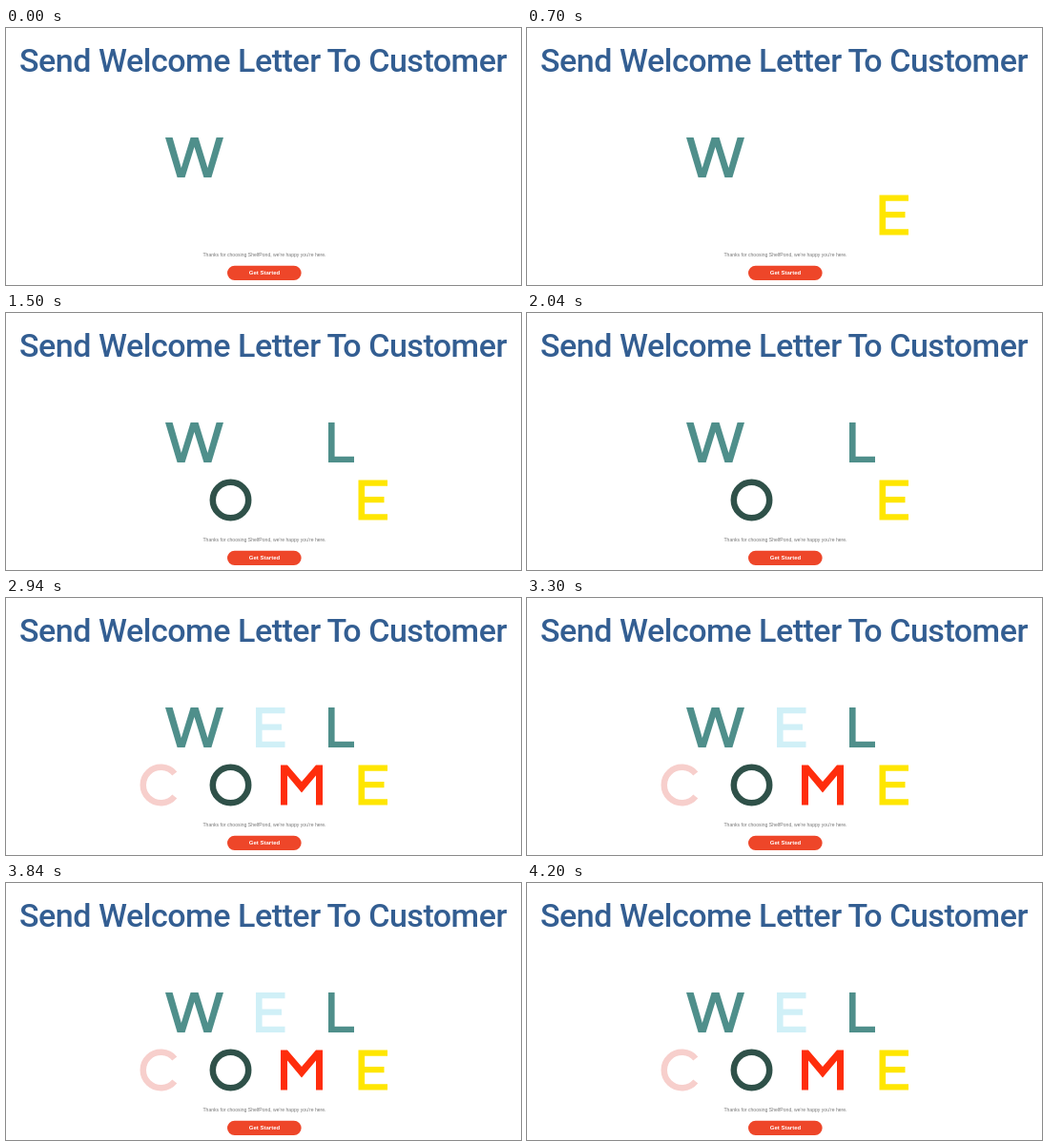
Write an HTML page that moves like this. It is 540x270 px and loops after 5 s.

```html
<!DOCTYPE html>
<html lang="en">
<head>
<meta charset="utf-8">
<title>Welcome letter</title>
<style>
  html, body { margin: 0; width: 100%; height: 100%; overflow: hidden; background: #fff; }
  svg { display: block; width: 540px; height: 270px; }
  text { text-anchor: middle; }
  .title { font: 500 34px Roboto, sans-serif; letter-spacing: -0.48px; fill: #335e92; }
  .note { font: 5.1px "Liberation Sans", Arial, sans-serif; fill: #777; }
  .button { font: bold 6px "Liberation Sans", Arial, sans-serif; fill: #fff; }
  .solid { fill: currentColor; }
  .round { fill: none; stroke: currentColor; stroke-width: 6.5px; }
</style>
</head>
<body>
<svg viewBox="0 0 540 270">
  <text class="title" x="269.5" y="46">Send Welcome Letter To Customer</text>
  <g id="letters" role="img" aria-label="Welcome"></g>
  <text class="note" x="271" y="239.5">Thanks for choosing ShelfPond, we're happy you're here.</text>
  <rect x="232" y="249.7" width="77.6" height="15.4" rx="7.7" fill="#ee4629"/>
  <text class="button" x="271" y="259.4">Get Started</text>
</svg>
<script>
const LOOP = 5000;
const TOP = 115, BOTTOM = 175.5;
const TEAL = "#4f8f8b";

// Geometric lettering, 42 units tall, drawn from its top left corner
const shapes = {
  W: "M0 0h7.6l9.2 32 9.8-32h8l9.8 32 9.2-32H61L48.4 42h-8L30.5 10 20.6 42h-8z",
  E: "M0 0H30.5V6.3H6.6V17.6H27V23.8H6.6V35.7H30.5V42H0z",
  L: "M0 0H6.6V35.7H27V42H0z",
  M: "M0 42V0H7L22 17.5 37 0H44V42H37V11L22 29 7 11V42z",
  O: "M3.8 21a18.7 18.7 0 0 1 37.4 0a18.7 18.7 0 0 1-37.4 0z",
  C: "M36.3 9a18.7 18.7 0 1 0 0 24",
};

// letter, left, top, colour, time it appears
const letters = [
  ["W", 167, TOP, TEAL, 0],
  ["E", 262, TOP, "#d0f0f7", 2400],
  ["L", 338, TOP, TEAL, 1500],
  ["C", 140.5, BOTTOM, "#f7cfcc", 2400],
  ["O", 213, BOTTOM, "#2f5149", 1500],
  ["M", 288, BOTTOM, "#ff2d0c", 2400],
  ["E", 369.5, BOTTOM, "#ffe600", 700],
].map(([letter, x, y, colour, start]) => {
  const node = document.createElementNS("http://www.w3.org/2000/svg", "path");
  node.setAttribute("d", shapes[letter]);
  node.setAttribute("class", "OC".includes(letter) ? "round" : "solid");
  node.setAttribute("transform", `translate(${x} ${y})`);
  node.setAttribute("color", colour);
  document.getElementById("letters").append(node);
  return { node, start };
});

const origin = performance.now();

function draw() {
  const time = (performance.now() - origin) % LOOP;
  for (const { node, start } of letters) {
    node.style.visibility = time >= start ? "visible" : "hidden";
  }
  requestAnimationFrame(draw);
}
draw();
</script>
</body>
</html>
```
